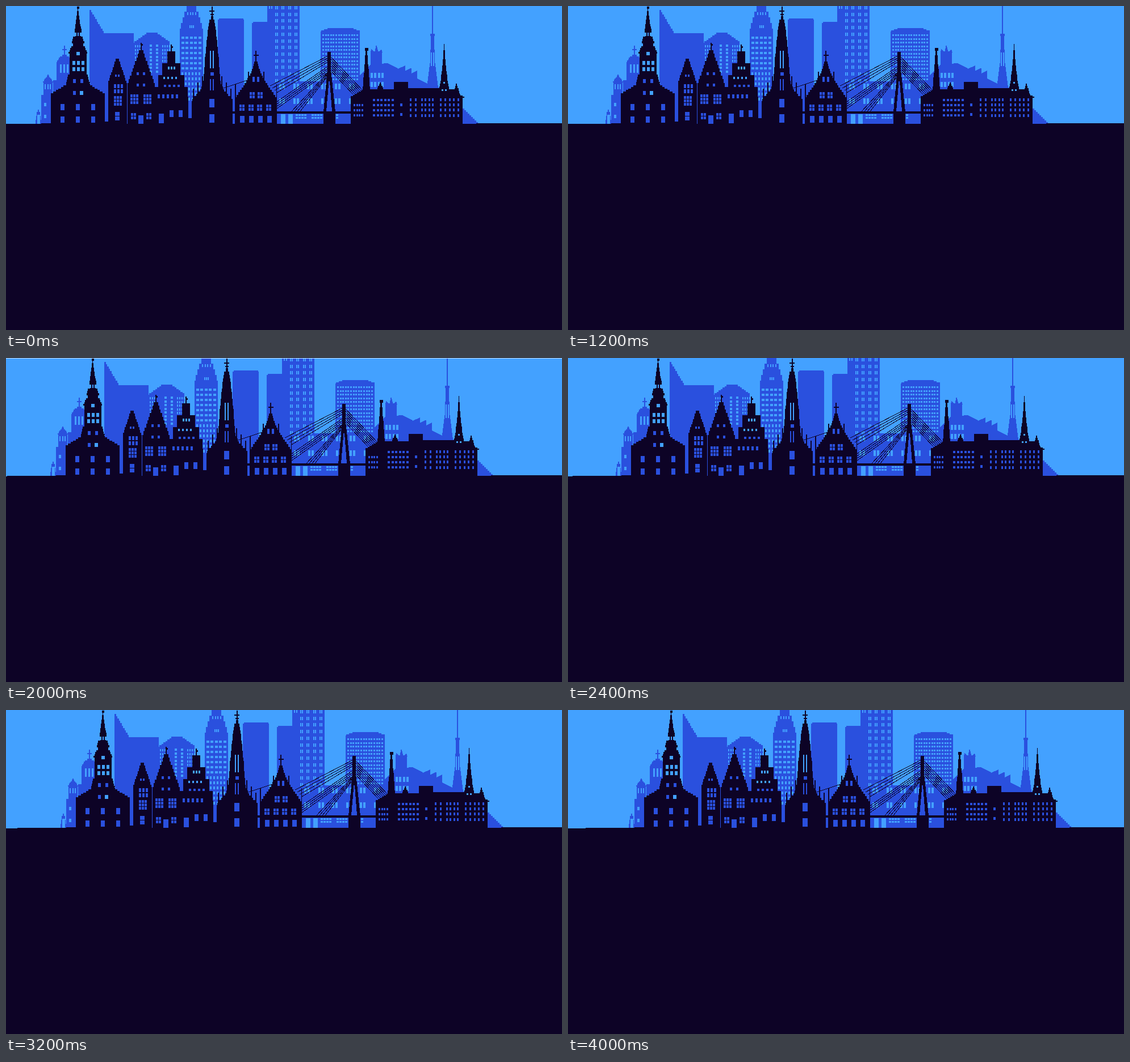
Write an HTML page that moves like this. It is 979 px wide and 572 px high and loops after 4.2 s.

```html
<!DOCTYPE html>
<html lang="en">
<head>
<meta charset="utf-8">
<title>Skyline</title>
<style>
  :root { --sky: #43a1ff; --mid: #2a50de; --dark: #0d0326; }
  html, body { margin: 0; width: 100%; height: 100%; overflow: hidden; background: var(--sky); }
  svg { display: block; width: 979px; height: 572px; shape-rendering: crispEdges; }
  .sky { fill: var(--sky); }
  .mid { fill: var(--mid); }
  .dark { fill: var(--dark); }
  .cable { fill: none; stroke: var(--dark); }
  #city { animation: drift 4.2s step-end infinite; }
  #edge { fill: #b9dcff; animation: edge 4.2s step-end infinite; }
  /* One move every 200 ms: a soft start, then 3px a step */
  @keyframes drift {
    0% { transform: translateX(0); }
    4.76% { transform: translateX(1px); }
    9.52% { transform: translateX(3px); }
    14.28% { transform: translateX(5px); }
    19.04% { transform: translateX(8px); animation-timing-function: steps(15, end); }
    90.47% { transform: translateX(53px); }
    95.23%, 100% { transform: translateX(55px); }
  }
  @keyframes edge {
    0%, 52.38%, 85.71%, 95.23%, 100% { opacity: 0; }
    47.61%, 80.95%, 90.47% { opacity: 1; }
  }
</style>
</head>
<body>
<svg viewBox="0 0 979 572">
  <rect class="sky" width="979" height="572"/>
  <rect class="dark" y="209" width="979" height="363"/>
  <g id="city"></g>
  <rect id="edge" width="979" height="1"/>
</svg>
<script>
const GROUND = 209;
const city = document.getElementById('city');
let ink;

function path(d, cls = ink) {
  const p = document.createElementNS('http://www.w3.org/2000/svg', 'path');
  p.setAttribute('class', cls);
  p.setAttribute('d', d);
  city.appendChild(p);
}
const box = (x, y, w, h) => `M${x} ${y}h${w}v${h}h${-w}z`;
const rect = (x, y, w, h = GROUND - y) => path(box(x, y, w, h));
const poly = (...pts) => path('M' + pts.join(' ') + 'z');
const line = (...pts) => path('M' + pts.join(' '), 'cable');
const times = (n, f) => Array.from({ length: n }, (_, i) => f(i));

// n centred blocks from half width r0 to r1; bend shapes the outline
function stack(cx, y0, y1, r0, r1 = r0, n = 1, bend = 1) {
  const h = (y1 - y0) / n;
  path(times(n, i => {
    const r = r0 + (r1 - r0) * (i / Math.max(1, n - 1)) ** bend;
    return box(cx - r, y0 + i * h, 2 * r, h);
  }).join(''));
}

// Steps that fall by dy as they reach dx further right
function stairs(x, y, dx, dy, n) {
  times(n, i => rect(x, y + i * dy, (i + 1) * dx));
}

function grid(x, y, cols, rows, dx, dy, w, h) {
  path(times(rows, r => times(cols, c => box(x + c * dx, y + r * dy, w, h)).join('')).join(''));
}

function cross(cx, y, h, arm) {
  rect(cx - 1, y, 2, h);
  rect(cx - arm, y + h / 3, 2 * arm, 2);
}

function farBuildings() {
  ink = 'mid';
  rect(56, 183, 2, 6);
  stack(57, 187, 208, 3, 5, 3, .5);
  stack(74, 121, 135, .8, 9, 6);
  rect(66, 134, 16);
  rect(62, 157, 24);
  cross(103, 70, 18, 4);
  stack(103, 86, 101, 4, 14, 6, .6);
  rect(89, 101, 28);
  rect(83, 131, 40);

  stairs(147, 7, 2.5, 4.1, 10);
  rect(147, 48, 78);
  stack(257, 47, 65, 10, 31, 7);
  rect(225, 65, 63);
  stack(326.5, 0, 50, 8.5, 20.5, 5, .8);
  rect(306, 50, 41);
  stack(396, 22, 24, 21.5);
  rect(373, 24, 46);
  rect(435, 28, 27);
  rect(433, 30, 27);
  rect(460, 0, 57);
  rect(477, 133, 148);
  stack(588.5, 39, 45, 23, 34, 3);
  rect(554, 45, 69);

  // Castle ridge with a saw-tooth slope
  poly(622, 208, 622, 123, 642, 103, 672, 101, 742, 137, 765, 145, 765, 208);
  rect(642, 80, 20);
  times(3, i => poly(642 + i * 7, 82, 643 + i * 9, i === 1 ? 68 : 76, 649 + i * 7, 82));
  times(3, i => poly(688 + i * 10, 112 + i * 5, 703 + i * 10.5, 105 + i * 4.5, 703 + i * 10.5, 122 + i * 4.5));

  rect(750, 0, 2, 50);
  rect(747, 49, 8, 4);
  stack(751, 53, 148, 3, 10, 12, 2);
  stairs(804, 181, 3, 3, 9);
}

function farWindows() {
  ink = 'sky';
  stack(57, 192, 208, 2.5);
  grid(68, 138, 3, 1, 4.5, 0, 2, 9);
  grid(67, 171, 1, 2, 0, 21, 4, 6);
  grid(95, 103, 3, 1, 6, 0, 3, 15);
  grid(227, 69, 3, 6, 4, 6.5, 2, 4);
  grid(253, 68, 2, 8, 11, 6.5, 4, 4);
  grid(275, 69, 4, 6, 4, 6.5, 2, 4);
  grid(319, 11, 4, 1, 4.6, 0, 2, 5);
  grid(323, 34, 3, 1, 3, 0, 2, 5);
  grid(309, 54, 5, 7, 7.4, 9, 5, 4);
  grid(309, 117, 6, 6, 6, 9, 3, 5);
  times(2, i => grid(474 + i * 3, 0, 4, 12, 11.4, 11.7, 2, 6));
  grid(463, 0, 2, 1, 4, 0, 2, 5);
  grid(557, 50, 14, 13, 4.6, 6.5, 3, 3);
  times(2, i => grid(481 + i * 6, 137, 6, 2, 24.5, 26, 4, 10));
  grid(484, 191, 2, 1, 13, 0, 8, 17);
  times(3, i => grid(510 + i * 28, 191, 4, 2, 5, 5, 4, 3));
  grid(642, 118, 4, 2, 6.4, 16, 4, 9);
  grid(748, 82, 2, 1, 4, 0, 2, 24);
}

// Stay cables: two tight bundles and a low fan left, one fan right
function cables() {
  times(4, i => {
    line(569, 87 + i * 3.5, 465 + i * 4, 141 + i * 4);
    line(569, 105 + i * 3.5, 477, 169 + i * 4);
    line(568, 116 + i * 2, 503 + i * 5, 186);
  });
  times(7, i => line(570, 88 + i * 4, 629 - i * 3, 150 + i));
  line(380, 146, 440, 126);
}

function oldTown() {
  ink = 'dark';
  rect(-24, 208, 1100);
  rect(62, 207, 17);
  rect(828, 207, 250);

  // Tiered church tower
  stack(126.5, 1, 5, 2);
  stack(126.5, 5, 40, .8, 5, 9);
  stack(126.5, 40, 54, 6, 5, 2);
  stack(126.5, 54, 66, 8.5, 11, 3);
  stack(126.5, 66, 71, 9);
  stack(126.5, 71, 84, 12, 16.5, 4);
  stack(126.5, 84, 121, 15);
  stack(126.5, 121, 138, 17.5, 21, 4);
  stack(126.5, 137, 157, 21, 47.5, 7);
  rect(79, 157, 95);

  // Gabled houses
  stack(196, 93, 137, 3, 16, 9);
  rect(180, 136, 33);
  rect(174, 204, 7);
  rect(237, 65, 1.5, 14);
  rect(238, 67, 3, 3);
  stack(238, 78, 142, 4, 24, 10);
  rect(214, 142, 48);
  rect(290, 68, 1.5, 14);
  rect(291, 71, 3, 3);
  stack(291, 80, 164, 7, 29, 4, .85);
  rect(262, 160, 59);
  rect(320, 198, 9);

  // Spire with buttresses and pinnacles
  cross(362.5, 1, 20, 4.5);
  stack(362.5, 14, 16, 3);
  stack(362.5, 18, 150, 2, 16, 22, .6);
  stack(363, 138, 168, 17, 35.5, 7, 1.3);
  rect(327, 168, 72);
  times(3, i => [-1, 1].forEach(s => rect(361.5 + s * (17 + i * 8), 124 + i * 11, 2)));

  cross(440, 79, 21, 4.5);
  stack(440, 98, 165, 3, 37, 16, 1.4);
  rect(403, 165, 74);
  grid(403, 138, 2, 1, 72.5, 0, 1.5, 30);
  grid(426, 116, 2, 1, 27, 0, 1.5, 24);

  // Bridge
  rect(397, 186, 210, 4);
  stack(569, 81, 112, 3);
  poly(566, 112, 572, 112, 580, 187, 580, 208, 559, 208, 559, 187);

  // Riverside palace
  stack(634.5, 74, 79, 3);
  stack(634.5, 79, 150, 1.5, 6.5, 9);
  stack(635, 147, 161, 7, 28, 7);
  stack(659, 135, 147, 1, 5, 4);
  rect(683, 134, 25);
  rect(708, 145, 55);
  rect(634, 147, 156);
  stack(771.5, 67, 153, .7, 9, 16, 1.5);
  stack(793, 137, 158, 1, 6, 5);
  stack(782, 150, 162, 8, 25, 6);
  rect(607, 160, 197);
}

function oldTownWindows() {
  ink = 'mid';
  poly(568.5, 133, 570, 133, 574, 186, 564, 186);
  grid(118, 129, 2, 1, 13, 0, 5, 7);
  rect(118, 150, 5, 7);
  grid(96, 173, 3, 2, 27, 22, 7, 11);

  grid(192, 121, 2, 1, 5, 0, 3, 4);
  grid(190, 138, 3, 2, 6, 9, 4, 7);
  grid(190, 159, 3, 3, 5, 6, 4, 5);
  grid(192, 187, 1, 2, 0, 8, 8, 7);

  times(2, i => {
    grid(230 + i * 11, 117, 1, 2, 0, 20, 4, 5);
    grid(219 + i * 23, 156, 3, 3, 5, 6, 4, 5);
    grid(220 + i * 27, 189, 2, 2, 5, 6, 4, 5);
  });
  rect(233, 193, 9, 15);

  grid(278, 139, 4, 1, 8, 0, 4, 4);
  grid(267, 156, 5, 1, 8, 0, 4, 7);
  grid(288, 184, 2, 1, 16, 0, 7, 12);
  rect(269, 190, 9, 17);

  stack(362.5, 117, 123, 3);
  grid(359, 129, 2, 1, 5, 0, 2, 20);
  grid(357.5, 164, 1, 2, 0, 27, 9, 15);

  grid(434, 125, 2, 1, 8, 0, 4, 9);
  times(2, i => {
    grid(429 + i * 5, 152, 2, 2, 14, 6, 4, 5);
    grid(411 + i * 5, 174, 4, 2, 15.7, 6, 4, 5);
  });
  grid(412, 194, 4, 1, 16, 0, 8, 12);

  grid(612, 173, 4, 3, 4.7, 9, 3, 4);
  grid(646, 164, 6, 4, 6.5, 9, 4, 4);
  grid(694, 172, 1, 2, 0, 17, 4, 5);
  grid(711, 163, 2, 4, 9, 9.2, 3, 5);
  grid(731, 163, 4, 4, 6.3, 9.2, 3, 5);
  grid(764, 163, 5, 4, 7.8, 9.2, 3, 5);

  ink = 'sky';
  grid(122, 47, 3, 1, 4, 0, 1.5, 6);
  stack(127, 81, 87, 3);
  grid(116.5, 97, 3, 2, 8, 11, 5, 7);
  rect(130, 150, 6, 7);
  grid(285, 107, 3, 1, 5, 0, 3, 5);
  grid(277, 125, 4, 1, 7, 0, 3, 4);
  grid(359, 79, 2, 1, 5, 0, 2, 31);
  stack(771.5, 134, 137, 1.5);
  grid(767, 147, 2, 1, 6, 0, 3, 3);
  rect(147, 136, 2, 1);
}

farBuildings();
farWindows();
cables();
oldTown();
oldTownWindows();
</script>
</body>
</html>
```
